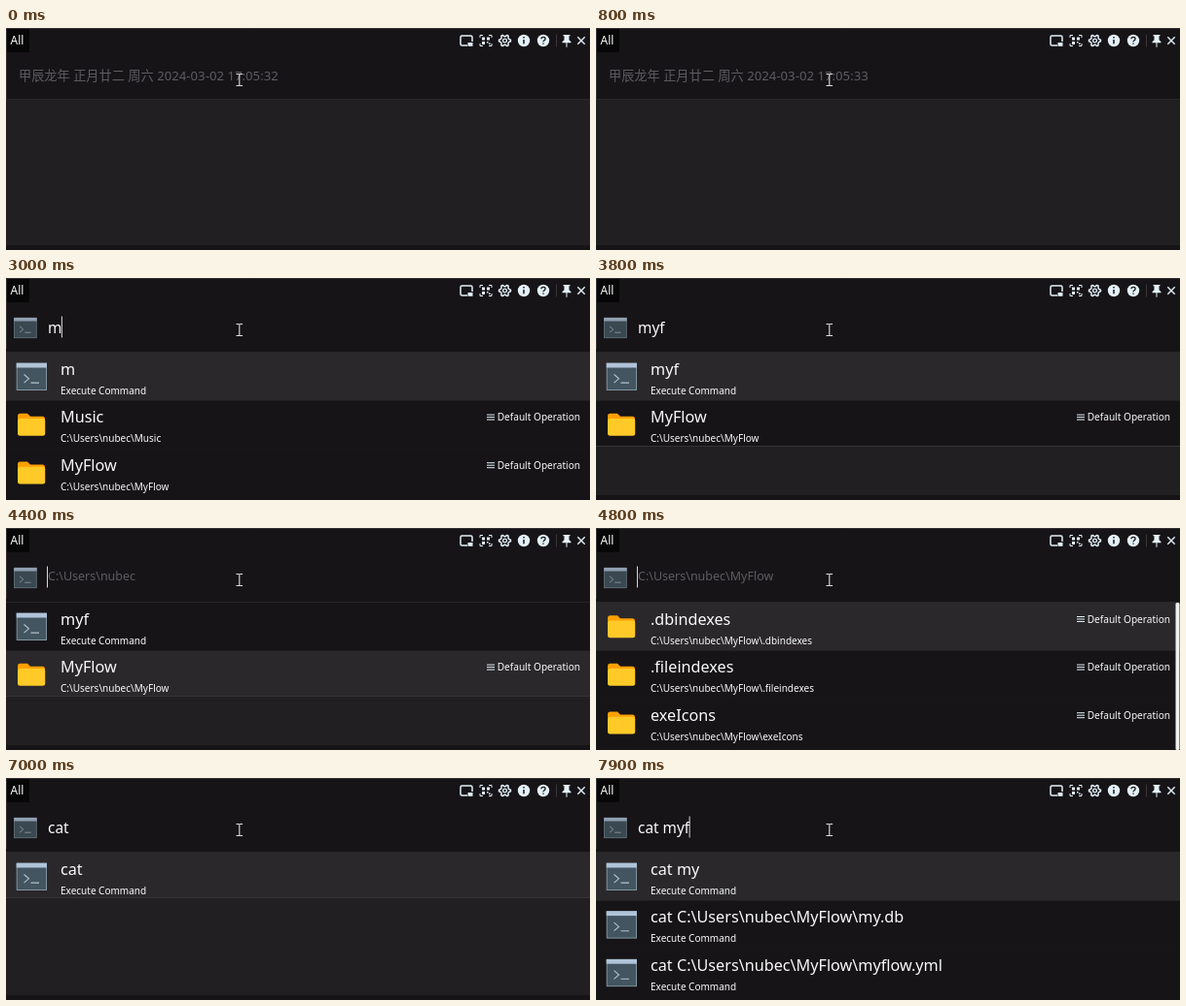
Recreate the animation shown at these times as an HTML page. Size 600 by 229 pixels, loop 8000 ms.

```html
<!DOCTYPE html>
<html lang="en">
<head>
<meta charset="utf-8">
<title>Launcher</title>
<style>
  html, body { margin: 0; width: 100%; height: 100%; overflow: hidden; background: #211f22; }
  svg { display: block; width: 600px; height: 229px; }
  text { font-family: "Noto Sans", "Noto Sans CJK SC", sans-serif; fill: #fafafa; white-space: pre; }
  .title { font-size: 16.2px; }
  .sub { font-size: 10px; }
  .label { font-size: 10.1px; text-anchor: end; }
  .query { font-size: 15.4px; }
  .hint { font-size: 12.5px; fill: #5e5c60; }
  .hint.date { font-size: 13.2px; }
  .line { fill: none; stroke: #e4f1f8; }
</style>
</head>
<body>
<svg viewBox="0 0 600 229">
  <defs>
    <symbol id="folder" viewBox="0 0 32 28" overflow="visible">
      <path d="M1.500 5.200q0-2.500 2.500-2.500h7.500l3 3h12.500q2.500 0 2.500 2.500v6H1.500z" fill="#ffa000"/>
      <rect x="1.500" y="8" width="28.200" height="17.700" rx="2.500" fill="#ffca28"/>
    </symbol>
    <symbol id="file" viewBox="0 0 32 28" overflow="visible">
      <path d="M7 1h11.500l7.500 7.500V25q0 2-2 2H7q-2 0-2-2V3q0-2 2-2z" fill="#50e6ff"/>
      <path d="M18.500 1l7.500 7.500h-7.500z" fill="#b5f4ff"/>
      <path d="M9.500 13h12M9.500 16.500h12M9.500 20h12M9.500 23h7" stroke="#15536b" stroke-width="1.400"/>
    </symbol>
    <symbol id="cmd" viewBox="0 0 32 28" overflow="visible">
      <rect x=".7" y=".7" width="30.300" height="27.300" fill="#425560" stroke="#82959f" stroke-width="1"/>
      <rect x=".2" y=".2" width="31.300" height="4.800" fill="#b0c3d8"/>
      <path d="M8 12l5 4.300-5 4.300M15 20.600h8.500" fill="none" stroke="#b4c2c9" stroke-width="1.100"/>
    </symbol>
  </defs>
  <rect width="600" height="229" fill="#211f22"/>
  <rect width="600" height="74" fill="#161417"/>
  <rect width="24" height="25" fill="#080708"/>
  <text x="4.500" y="17.300" font-size="12">All</text>

  <g id="toolbar" fill="#e4f1f8">
    <path class="line" d="M474 18h-5.500q-1.500 0-1.500-1.500v-7q0-1.500 1.500-1.500h9q1.500 0 1.500 1.500V14" stroke-width="1.500"/>
    <path d="M474.500 15h5v3.800h-5z"/>
    <path class="line" d="M487 10V7.500h3M496 7.500h3V10M487 16v2.500h3M496 18.500h3V16"/>
    <path d="M489 9.500h3v3h-3zM494 9.500h3v3h-3zM489 14h3v3h-3zM494 14h1.500v1.500H494zM496 15.500h1.500V17H496z"/>
    <g transform="translate(512.500 13)" class="line">
      <path id="gear" stroke-width="1.500" stroke-linejoin="round"/>
      <circle r="1.900" stroke-width="1.400"/>
    </g>
    <circle cx="532" cy="13" r="6.200"/>
    <path d="M532 12v4.300M532 9v1.600" stroke="#161417" stroke-width="1.500"/>
    <circle cx="552" cy="13" r="6.200"/>
    <path d="M549.900 11.300q0-2 2.100-2t2.100 1.800q0 1.200-1.300 1.900-.8.500-.8 1.300M552 15.400v1.400" fill="none" stroke="#161417" stroke-width="1.300"/>
    <path d="M565.500 6.500v13" stroke="#39373a"/>
    <path d="M572.500 7h7v1.300h-1v4l2 2v1h-4v4.500h-1v-4.500h-4v-1l2-2v-4h-1z"/>
    <path class="line" d="M587.300 9.300l7.400 7.400M594.700 9.300l-7.400 7.400" stroke-width="1.400"/>
  </g>
  <path d="M0 .5H600M.5 0V229" stroke="#302e31" fill="none"/>

  <g id="list"></g>
  <g id="search"></g>
  <path d="M236.500 47.500h2.500l.8.600.8-.6h2.500M239.800 48v11M236.500 59.500h2.500l.8-.6.800.6h2.500" fill="none" stroke="#dededf" stroke-width="1.100"/>
</svg>
<script>
const LOOP = 8000, ROW = 49.6, TOP = 77;
const HOME = "C:\\Users\\nubec", FLOW = HOME + "\\MyFlow";
const date = s => "甲辰龙年 正月廿二 周六 2024-03-02 17:05:" + s;

const cmd = title => ({ icon: "cmd", title, sub: "Execute Command" });
const entry = (dir, title, icon = "folder") => ({ icon, title, sub: dir + "\\" + title });
const catFile = name => cmd(`cat ${FLOW}\\${name}`);

const homeRows = [entry(HOME, ".android"), entry(HOME, ".bash_history", "file"), entry(HOME, ".cargo")];
const flowRows = [".dbindexes", ".fileindexes", "exeIcons"].map(n => entry(FLOW, n));
const myFlow = entry(HOME, "MyFlow");
const catRows = name => [cmd(name), catFile("my.db"), catFile("myflow.yml")];

// Each step overrides part of the state from its start time on.
const steps = [
  [0, { icon: false, hint: date(32), query: "", caret: false, rows: [], active: 0, thumb: 0 }],
  [300, { caret: true }],
  [800, { caret: false, hint: date(33) }],
  [1300, { caret: true, icon: true }],
  [1400, { rows: homeRows, thumb: 65 }],
  [1700, { hint: HOME }],
  [1800, { caret: false }],
  [2300, { caret: true }],
  [2800, { caret: false }],
  [3000, { caret: true, query: "m", rows: [cmd("m"), entry(HOME, "Music"), myFlow], thumb: 0 }],
  [3200, { query: "my", rows: [cmd("my"), myFlow] }],
  [3300, { query: "myf", rows: [cmd("myf"), myFlow] }],
  [3800, { caret: false }],
  [4000, { active: 1 }],
  [4300, { caret: true }],
  [4400, { query: "" }],
  [4800, { hint: FLOW, rows: flowRows, active: 0, thumb: 152 }],
  [4900, { caret: false }],
  [5400, { caret: true }],
  [5900, { caret: false }],
  [6100, { caret: true, query: "c", rows: [cmd("c")], thumb: 0 }],
  [6200, { query: "ca", rows: [cmd("ca")] }],
  [6400, { query: "cat", rows: [cmd("cat")] }],
  [6500, { query: "cat " }],
  [7000, { caret: false }],
  [7500, { caret: true, query: "cat m", rows: [cmd("cat m")] }],
  [7600, { rows: catRows("cat m") }],
  [7800, { query: "cat my", rows: catRows("cat my") }],
  [7900, { query: "cat myf" }]
];
let merged = {};
const states = steps.map(([, change]) => merged = { ...merged, ...change });

const $ = id => document.getElementById(id);
const rect = (x, y, w, h, fill) => `<rect x="${x}" y="${y}" width="${w}" height="${h}" fill="${fill}"/>`;
const text = (x, y, cls, s) => `<text x="${x}" y="${y}" class="${cls}">${s}</text>`;
const icon = (name, x, y, w, h) => `<use href="#${name}" x="${x}" y="${y}" width="${w}" height="${h}"/>`;
const labels = { folder: ["Default Operation", 494], file: ["Preview", 543] };

function rowMarkup(row, i, active) {
  const y = TOP + i * ROW;
  let out = rect(0, y, 600, ROW, i === active ? "#2a282b" : "#161417")
    + icon(row.icon, 10.5, y + 10.5, 32, 28)
    + text(56, y + 22.5, "title", row.title)
    + text(56, y + 42.8, "sub", row.sub);
  if (labels[row.icon]) {
    const [label, x] = labels[row.icon];
    out += `<path class="line" d="M${x} ${y + 14.5}h8m-8 2.500h8m-8 2.500h8"/>` + text(590, y + 20.5, "label", label);
  }
  return out;
}

// The panel grows by 50px per row and cuts off the end of the last row.
function panelEnd(count) {
  const end = 74 + 50 * count;
  return rect(0, end, 600, 224 - end, "#211f22")
    + (count && end < 224 ? rect(0, end - 1, 600, 1, "#343235") : "")
    + rect(0, 224, 600, 5, "#161417");
}

function render(s) {
  const bottom = s.icon ? 76 : 73;
  $("list").innerHTML = s.rows.map((row, i) => rowMarkup(row, i, s.active)).join("")
    + panelEnd(s.rows.length)
    + rect(0, 73, 600, bottom - 72, "#161417")
    + rect(0, bottom, 600, 1, "#29272a")
    + (s.thumb ? `<rect x="595.500" y="77" width="4" height="${s.thumb}" rx="1.500" fill="#f0f0f0"/>` : "");

  const x = s.icon ? 43 : 13;
  const hintClass = s.hint.startsWith("C") ? "hint" : "hint date";
  $("search").innerHTML = (s.icon ? `<g opacity=".8">${icon("cmd", 8, 40.5, 24, 21.5)}</g>` : "")
    + (s.query ? text(x, 57.3, "query", s.query) : text(x, 53.8, hintClass, s.hint));
  if (s.caret) {
    const width = s.query ? $("search").querySelector("text").getComputedTextLength() : -0.5;
    $("search").insertAdjacentHTML("beforeend", rect(x + width - 0.5, 39.5, 1, 22, "#d8d8da"));
  }
}

const gearPoints = Array.from({ length: 24 }, (_, i) => {
  const r = i % 4 < 2 ? 6 : 4.4, a = (i - 0.5) * Math.PI / 12;
  return (r * Math.cos(a)).toFixed(2) + " " + (r * Math.sin(a)).toFixed(2);
});
$("gear").setAttribute("d", "M" + gearPoints.join("L") + "z");

let shown = -1;
const start = performance.now();
function tick() {
  const t = (performance.now() - start) % LOOP;
  const index = steps.findLastIndex(([at]) => at <= t);
  if (index !== shown) render(states[shown = index]);
  requestAnimationFrame(tick);
}
tick();
</script>
</body>
</html>
```
